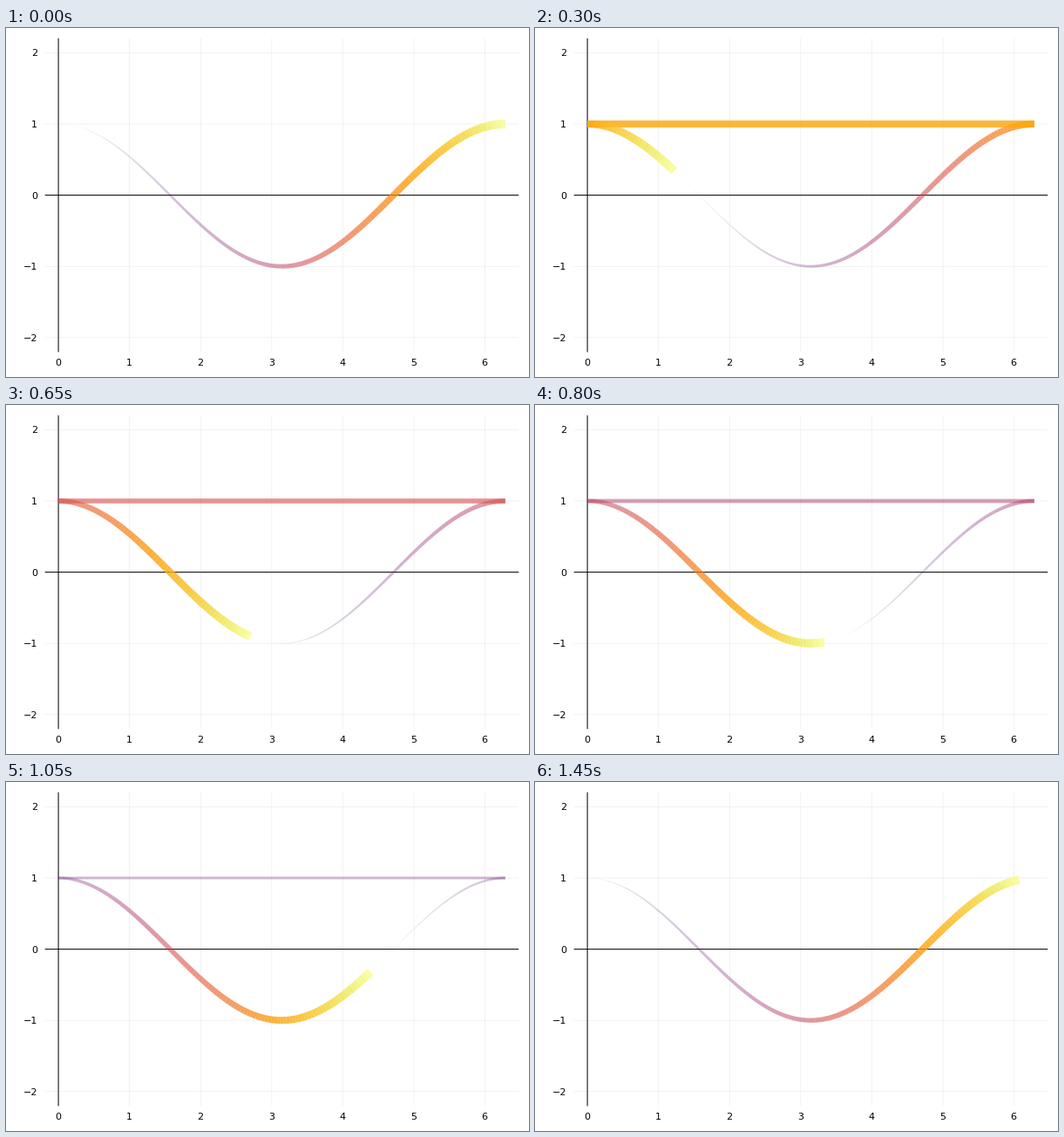
A matplotlib script for the animation above (1500 ms loop, 600 px wide and 400 px high).

```python
import numpy as np
import matplotlib.pyplot as plt
from matplotlib.animation import FuncAnimation
from matplotlib.collections import LineCollection

W, H, DPI = 600, 400, 100
LEFT, RIGHT, TOP, BOTTOM = 44.7, 588.2, 11.8, 371.4
SCALE = 81.6            # pixels per data unit
X0, Y0 = 60.08, 191.6   # pixel position of the data origin
PT = 72 / DPI           # points per pixel

N = 150                 # points along the curve
STEP = 5                # points advanced per frame
FRAMES = N // STEP


def to_px(x, y):
    return X0 + SCALE * x, Y0 - SCALE * y


fig = plt.figure(figsize=(W / DPI, H / DPI), dpi=DPI, facecolor="white")
ax = fig.add_axes([0, 0, 1, 1])
ax.set_xlim(0, W)
ax.set_ylim(H, 0)
ax.axis("off")


def rule(xs, ys, width, alpha):
    ax.plot(xs, ys, color="black", lw=width * PT, alpha=alpha,
            solid_capstyle="butt", snap=False, zorder=1)


def label(x, y, value, align):
    ax.text(x, y, str(value).replace("-", "\u2212"), ha=align, va="baseline",
            family="DejaVu Sans", size=8, color="black")


for v in range(7):
    x, _ = to_px(v, 0)
    rule([x, x], [TOP, BOTTOM], 0.5, 0.1)
    label(x - 0.5, 387, v, "center")

for v in range(-2, 3):
    _, y = to_px(0, v)
    rule([LEFT, RIGHT], [y, y], 0.5, 0.1)
    label(36, y + 4, v, "right")

rule([LEFT, RIGHT], [Y0, Y0], 1, 1)
rule([X0, X0], [TOP, BOTTOM], 1, 1)

t = np.linspace(0, 2 * np.pi, N)
points = np.column_stack(to_px(t, np.cos(t)))

# Width, opacity and colour all grow from tail to head.
growth = np.arange(N - 1) / (N - 1)
colors = plt.get_cmap("inferno")(growth)
colors[:, 3] = growth

trail = LineCollection([], linewidths=10 * growth * PT, colors=colors,
                       capstyle="butt", zorder=2)
trail.set_snap(False)
ax.add_collection(trail, autolim=False)


def draw(frame):
    path = np.roll(points, -STEP * frame, axis=0)
    trail.set_segments(np.stack([path[:-1], path[1:]], axis=1))
    return [trail]


anim = FuncAnimation(fig, draw, frames=FRAMES, interval=50, repeat=True,
                     repeat_delay=0, blit=False)
plt.show()
```
